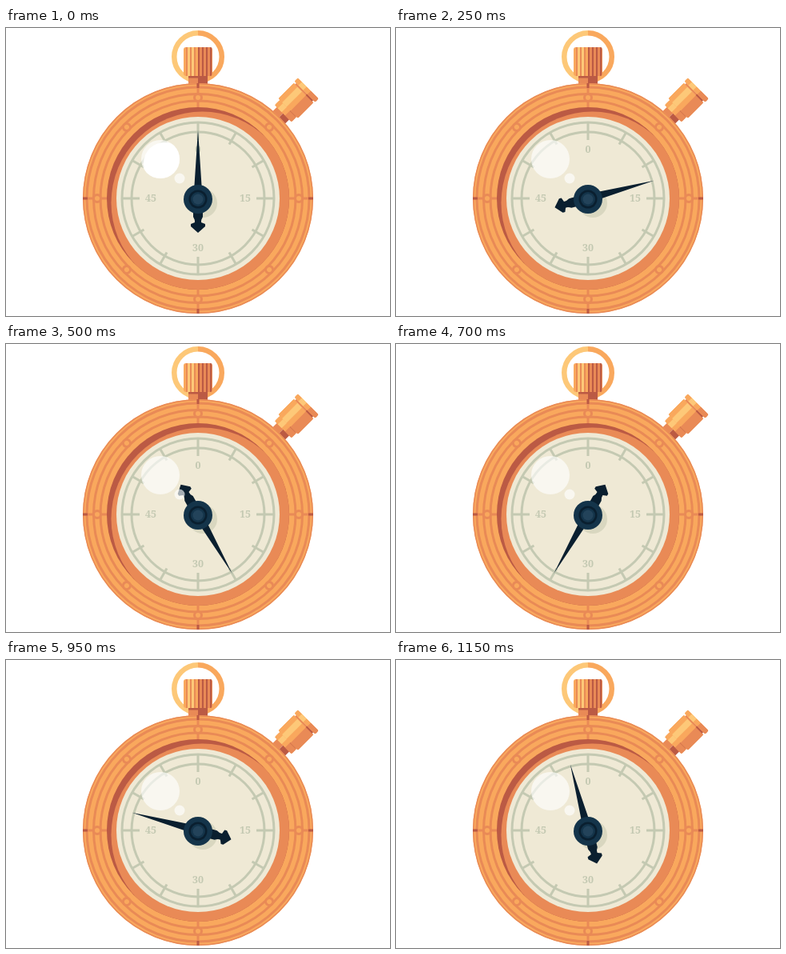
An HTML page with a canvas for the animation above (1200 ms loop, 480x360 px).

```html
<!DOCTYPE html>
<html lang="en">
<head>
<meta charset="utf-8">
<title>Stopwatch</title>
<style>
html, body { margin: 0; width: 100%; height: 100%; overflow: hidden; background: #fff; }
canvas { display: block; }
</style>
</head>
<body>
<canvas id="stage" width="480" height="360"></canvas>
<script>
const ctx = document.getElementById('stage').getContext('2d');
const CX = 240, CY = 213, LOOP = 1200, STEPS = 24;
const LIGHT = '#fdc878', ORANGE = '#f9a85d', DEEP = '#e98a56', RUST = '#bb5a44';
const CREAM = '#efe9d5', SAGE = '#c4c9b2', NAVY = '#0a1f2f', STEEL = '#14344a';

function disc(x, y, r, color) {
  ctx.fillStyle = color;
  ctx.beginPath();
  ctx.arc(x, y, r, 0, Math.PI * 2);
  ctx.fill();
}

function ring(x, y, r, width, color, from = 0, to = Math.PI * 2) {
  ctx.strokeStyle = color;
  ctx.lineWidth = width;
  ctx.beginPath();
  ctx.arc(x, y, r, from, to);
  ctx.stroke();
}

function box(x, y, w, h, color) {
  ctx.fillStyle = color;
  ctx.fillRect(x, y, w, h);
}

// Runs draw in a frame centred on the dial, turned clockwise by deg.
function turned(deg, draw) {
  ctx.save();
  ctx.translate(CX, CY);
  ctx.rotate(deg * Math.PI / 180);
  draw();
  ctx.restore();
}

function crown() {
  ring(CX, 36, 29.75, 6.5, LIGHT, Math.PI / 2, Math.PI * 1.5);
  ring(CX, 36, 29.75, 6.5, ORANGE, -Math.PI / 2, Math.PI / 2);
  box(228, 60, 12, 10, DEEP);
  box(228, 60, 12, 2.5, RUST);
  box(240, 60, 12, 10, RUST);
  ctx.save();
  ctx.beginPath();
  ctx.roundRect(222, 24, 36, 36, 3);
  ctx.clip();
  box(222, 24, 18, 36, ORANGE);
  box(240, 24, 18, 36, DEEP);
  for (const x of [227, 232]) box(x, 24, 3, 36, LIGHT);
  for (const x of [225, 230, 235]) box(x, 24, 2, 36, DEEP);
  for (const x of [240, 245, 250, 255]) box(x, 24, 2, 36, RUST);
  ctx.restore();
}

// One button section, shaded from light to dark across its width.
function section(near, far, half) {
  const h = far - near;
  ctx.save();
  ctx.beginPath();
  ctx.roundRect(-half, -far, half * 2, h, 2);
  ctx.clip();
  box(-half, -far, half * 2, h, ORANGE);
  box(-half * 0.6, -far, half * 0.45, h, LIGHT);
  box(half * 0.25, -far, half, h, DEEP);
  ctx.restore();
}

function button() {
  turned(45, () => {
    box(-11, -152, 11, 12, DEEP);
    box(0, -152, 11, 12, RUST);
    section(150, 160, 15);
    box(4, -160, 10, 1.5, RUST);
    section(159, 187, 17.5);
    box(-15, -189, 30, 2.5, DEEP);
    box(4, -189, 11, 2.5, RUST);
    section(188.5, 195, 18.5);
  });
}

function body() {
  disc(CX, CY, 144, ORANGE);
  ring(CX, CY, 143.25, 1.5, DEEP);
  for (const r of [139, 130.5, 122]) ring(CX, CY, r, 3, DEEP);
  for (let a = 0; a < 360; a += 45) {
    turned(a, () => {
      if (a % 90 === 0) {
        box(-1.5, -144, 3, 31, DEEP);
        box(-1.5, -144, 3, 6, RUST);
      }
      disc(0, -126, 6, DEEP);
      disc(0, -126, 3, ORANGE);
    });
  }
  ctx.save();
  ctx.beginPath();
  ctx.arc(CX, CY, 114, 0, Math.PI * 2);
  ctx.clip();
  box(CX - 114, CY - 114, 228, 228, RUST);
  disc(CX + 5.5, CY + 5.5, 114, DEEP);
  ctx.restore();
}

function dial() {
  disc(CX, CY, 102, CREAM);
  ring(CX, CY, 95, 3, SAGE);
  ring(CX, CY, 83, 3, SAGE);
  for (let a = 0; a < 360; a += 30) {
    const inner = a % 90 ? 78 : 73;
    turned(a, () => box(-1.5, -95, 3, 95 - inner, SAGE));
  }
  ctx.fillStyle = SAGE;
  ctx.font = '700 12.5px "Noto Serif", serif';
  ctx.textAlign = 'center';
  ctx.fillText('0', 240, 155.5);
  ctx.fillText('15', 299, 217);
  ctx.fillText('30', 240, 278.5);
  ctx.fillText('45', 181, 217);
}

function hand(deg) {
  disc(246, 219, 18, '#d9d7c0');
  turned(deg, () => {
    ctx.fillStyle = NAVY;
    ctx.beginPath();
    ctx.moveTo(0, -85.5);
    ctx.lineTo(4.8, -12);
    ctx.lineTo(6, 14);
    ctx.lineTo(6, 23);
    ctx.quadraticCurveTo(3.5, 27, 4, 30);
    ctx.lineTo(9, 32);
    ctx.lineTo(9, 35);
    ctx.lineTo(0, 43);
    ctx.lineTo(-9, 35);
    ctx.lineTo(-9, 32);
    ctx.lineTo(-4, 30);
    ctx.quadraticCurveTo(-3.5, 27, -6, 23);
    ctx.lineTo(-6, 14);
    ctx.lineTo(-4.8, -12);
    ctx.fill();
  });
  disc(CX, 214, 18, STEEL);
  disc(CX, 214, 11.5, NAVY);
  disc(CX, 214, 9, STEEL);
  disc(CX, 214, 6.5, '#23435a');
}

function glare(step) {
  const haze = 'rgba(255,255,255,.64)';
  disc(193, 164, 24, haze);
  disc(217, 188, 6.5, haze);
  if (step) return;
  // Brighter glint as the hand passes zero.
  ctx.save();
  ctx.beginPath();
  ctx.arc(193, 164, 24, 0, Math.PI * 2);
  ctx.clip();
  disc(198, 169, 26, '#fff');
  ctx.restore();
}

function frame(now) {
  const step = Math.floor((now % LOOP) / (LOOP / STEPS));
  box(0, 0, 480, 360, '#fff');
  crown();
  button();
  body();
  dial();
  hand(step * 360 / STEPS);
  glare(step);
}

const start = performance.now();
function tick() {
  frame(performance.now() - start);
  requestAnimationFrame(tick);
}
tick();
</script>
</body>
</html>
```
